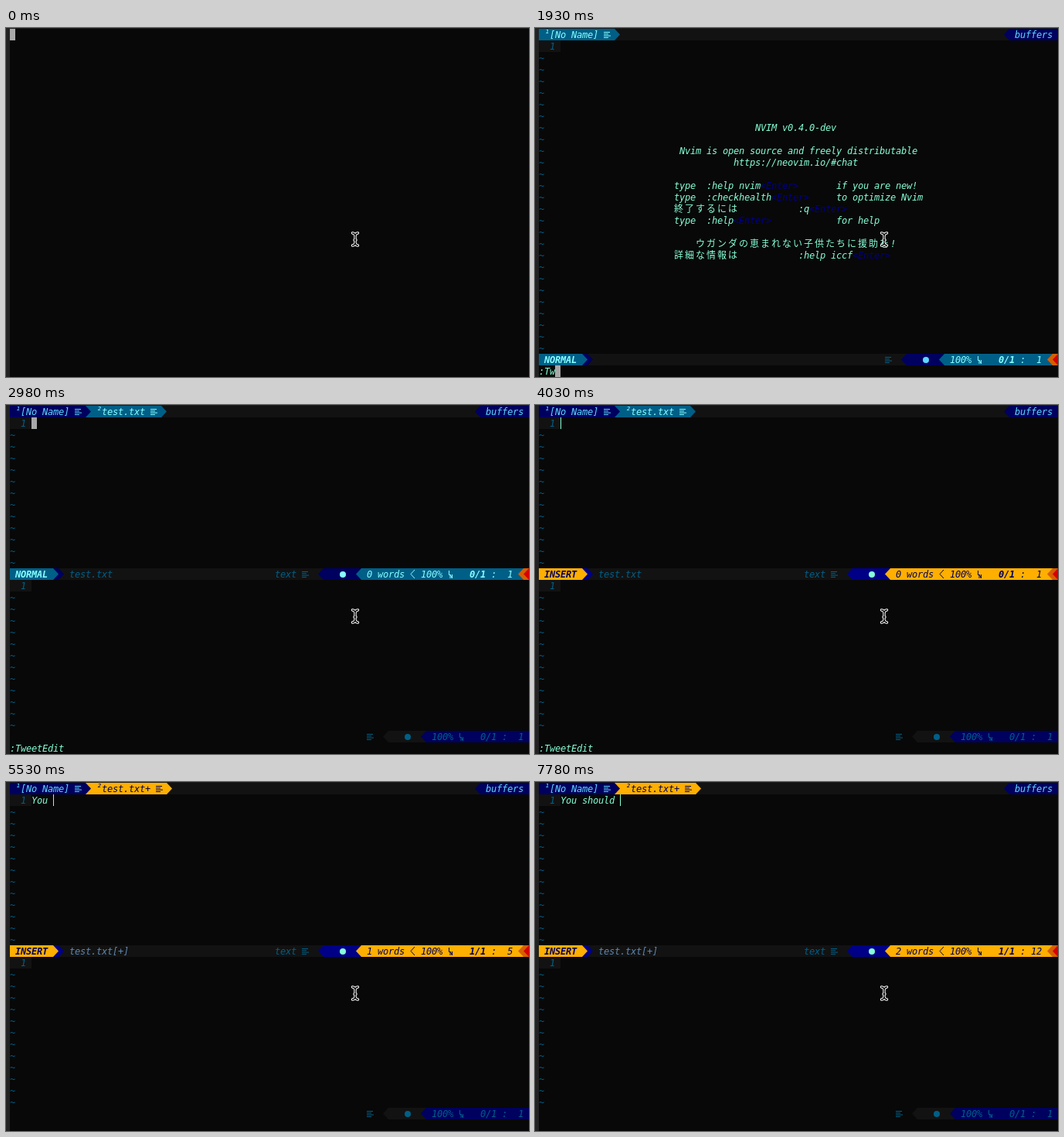
An HTML page with a canvas for the animation above (8 s loop, 677 by 451 pixels).

```html
<!DOCTYPE html>
<html lang="ja">
<head>
<meta charset="utf-8">
<title>Terminal editor</title>
<style>
html, body { margin: 0; width: 677px; height: 451px; overflow: hidden; background: #080808; }
canvas { display: block; }
</style>
</head>
<body>
<canvas id="stage" width="677" height="451"></canvas>
<script>
const ctx = document.getElementById('stage').getContext('2d');
const LOOP = 8000, CW = 7, RH = 15, COLS = 96;
const BG = '#080808', BAR = '#121212', NAVY = '#00005f', TEAL = '#005f87', AMBER = '#ffaf00',
  MINT = '#87ffd7', CYAN = '#87ffff', SKY = '#5fd7ff', GREY = '#a8a8a8';
const MONO = '12px "DejaVu Sans Mono", monospace';
const CJK = '12px "Noto Sans CJK JP", "Noto Sans CJK", sans-serif';

// Each step overrides part of the screen state from its time on.
const steps = [
  [0, { blank: true, split: false, insert: false, compl: false, line: '', words: 0,
        cmd: '', pending: '', menu: -1, popup: '', cursor: [0, 0] }],
  [150, { blank: false, cursor: [4, 1] }],
  [1190, { pending: ':' }],
  [1340, { pending: '', cmd: ':', cursor: [1, 29] }],
  [1780, { cmd: ':T', cursor: [2, 29] }],
  [1930, { cmd: ':Tw', cursor: [3, 29] }],
  [2080, { cmd: ':Tweet', menu: 0, cursor: [6, 29] }],
  [2380, { cmd: ':TweetEdit', menu: 1, cursor: [10, 29] }],
  [2830, { menu: -1, cursor: null }],
  [2980, { split: true, cursor: [4, 1] }],
  [3730, { pending: ':', cursor: null }],
  [4030, { pending: '', insert: true }],
  [4630, { line: 'Y', words: 1 }],
  [4780, { line: 'Yo' }],
  [5080, { line: 'You', compl: true, popup: 'You', cmd: '唯一の該当' }],
  [5530, { line: 'You ', compl: false, popup: '', cmd: '' }],
  [5980, { line: 'You s', words: 2 }],
  [6130, { line: 'You sh' }],
  [6280, { compl: true, popup: 'sh', cmd: '唯一の該当' }],
  [6580, { line: 'You sho', compl: false, popup: '' }],
  [6730, { line: 'You shou', cmd: '' }],
  [7480, { line: 'You shoul' }],
  [7630, { line: 'You should' }],
  [7780, { line: 'You should ' }]
];

const X = col => 5 + col * CW;
const Y = row => 1 + row * RH;

function fill(col, row, n, color, rows = 1) {
  ctx.fillStyle = color;
  ctx.fillRect(X(col), Y(row), n * CW, rows * RH);
}

// Text on the cell grid; wide characters take two cells.
function put(text, col, row, color, bold = false, dy = 0) {
  ctx.fillStyle = color;
  for (const ch of text) {
    const wide = ch.charCodeAt(0) > 0x2e80;
    ctx.font = wide ? CJK : 'italic ' + (bold ? 'bold ' : '') + MONO;
    ctx.fillText(ch, X(col), Y(row) + 12 + dy);
    col += wide ? 2 : 1;
  }
  return col;
}

// Triangular separator: dir 1 points right, -1 points left.
function arrow(col, row, color, under, dir) {
  fill(col, row, 1, under);
  const x = X(col) + (dir < 0 ? CW : 0), y = Y(row);
  ctx.fillStyle = color;
  ctx.beginPath();
  ctx.moveTo(x, y);
  ctx.lineTo(x + dir * CW, y + RH / 2);
  ctx.lineTo(x, y + RH);
  ctx.fill();
}

function stroke(points, color, width = 1) {
  ctx.strokeStyle = color;
  ctx.lineWidth = width;
  ctx.beginPath();
  points.forEach(([x, y], i) => i ? ctx.lineTo(x, y) : ctx.moveTo(x, y));
  ctx.stroke();
}

function linesIcon(col, row, color) {
  ctx.fillStyle = color;
  [8, 6, 9, 6].forEach((w, i) => ctx.fillRect(X(col), Y(row) + 4 + i * 2.3, w, 1));
}

function lineMark(col, row, color) {
  const x = X(col) + 1.5, y = Y(row);
  stroke([[x, y + 3], [x, y + 8.5], [x + 2, y + 8.5]], color);
  stroke([[x + 1.5, y + 13], [x + 1.5, y + 8], [x + 4, y + 13], [x + 4, y + 8]], color);
}

function dot(col, row, color) {
  ctx.fillStyle = color;
  ctx.beginPath();
  ctx.arc(X(col) + 4, Y(row) + 8, 4, 0, Math.PI * 2);
  ctx.fill();
}

function tabline(s) {
  const changed = s.line !== '';
  const accent = changed ? AMBER : TEAL, ink = changed ? NAVY : CYAN;
  const first = s.split ? NAVY : TEAL, firstInk = s.split ? SKY : CYAN;
  fill(0, 0, COLS, BAR);
  fill(0, 0, 14, first);
  put('¹', 1, 0, firstInk, false, -2);
  put('[No Name]', 2, 0, firstInk);
  linesIcon(12, 0, firstInk);
  arrow(14, 0, first, s.split ? accent : BAR, 1);
  if (s.split) {
    const name = changed ? 'test.txt+' : 'test.txt', end = 17 + name.length;
    fill(15, 0, end - 12, accent);
    put('²', 16, 0, ink, false, -2);
    put(name, 17, 0, ink);
    linesIcon(end + 1, 0, ink);
    arrow(end + 3, 0, accent, BAR, 1);
  }
  arrow(86, 0, NAVY, BAR, -1);
  fill(87, 0, 9, NAVY);
  put('buffers', 88, 0, SKY);
}

function statusLine(s, row) {
  const accent = s.insert ? AMBER : TEAL, ink = s.insert ? NAVY : CYAN;
  const mid = s.insert ? '#000087' : NAVY;
  const mode = s.compl ? 'INSERT COMPL' : s.insert ? 'INSERT' : 'NORMAL';
  const end = mode.length + 2, right = s.split ? 64 : 74;
  fill(0, row, COLS, BAR);
  fill(0, row, end, accent);
  put(mode, 1, row, ink, true);
  arrow(end, row, accent, mid, 1);
  arrow(end + 1, row, mid, BAR, 1);
  if (s.split) {
    put(s.line ? 'test.txt[+]' : 'test.txt', end + 3, row, s.line ? '#5f87af' : TEAL);
    put('text', 49, row, TEAL);
  }
  linesIcon(right - 10, row, TEAL);
  arrow(right - 7, row, mid, BAR, -1);
  fill(right - 6, row, 6, mid);
  dot(right - 3, row, s.insert ? MINT : s.split ? CYAN : SKY);
  arrow(right, row, accent, mid, -1);
  fill(right + 1, row, 94 - right - 1, accent);
  if (s.split) {
    put(s.words + ' words', 66, row, ink);
    const x = X(74), y = Y(row);
    stroke([[x + 6, y + 2], [x + 1, y + 7.5], [x + 6, y + 13]], ink);
  }
  put('100%', 76, row, ink);
  lineMark(81, row, ink);
  put(s.line ? '1/1' : '0/1', 85, row, ink, true);
  put(':', 89, row, ink);
  put(String(s.line.length + 1).padStart(3), 90, row, ink);
  arrow(94, row, '#d75f00', accent, -1);
  arrow(95, row, '#d70000', '#d75f00', -1);
}

function idleStatus(row) {
  linesIcon(66, row, TEAL);
  arrow(69, row, BAR, BG, -1);
  fill(70, row, 6, BAR);
  dot(73, row, TEAL);
  arrow(76, row, NAVY, BAR, -1);
  fill(77, row, 19, NAVY);
  put('100%', 78, row, TEAL);
  lineMark(83, row, TEAL);
  put('0/1 :  1', 87, row, TEAL);
}

function pane(top, bottom) {
  fill(0, top, 4, BAR);
  put('1', 2, top, TEAL);
  for (let r = top + 1; r < bottom; r++) put('~', 0, r, TEAL);
}

function intro() {
  const enter = (text, col, row) => put('<Enter>', put(text, col, row, MINT), row, '#000087');
  put('NVIM v0.4.0-dev', 40, 8, MINT);
  put('Nvim is open source and freely distributable', 26, 10, MINT);
  put('https://neovim.io/#chat', 36, 11, MINT);
  put('type', 25, 13, MINT);
  enter(':help nvim', 31, 13);
  put('if you are new!', 55, 13, MINT);
  put('type', 25, 14, MINT);
  enter(':checkhealth', 31, 14);
  put('to optimize Nvim', 55, 14, MINT);
  put('終了するには', 25, 15, MINT);
  enter(':q', 48, 15);
  put('type', 25, 16, MINT);
  enter(':help', 31, 16);
  put('for help', 55, 16, MINT);
  put('ウガンダの恵まれない子供たちに援助を!', 29, 18, MINT);
  put('詳細な情報は', 25, 19, MINT);
  enter(':help iccf', 48, 19);
}

function menus(s) {
  if (s.menu >= 0) {
    ['Tweet', 'TweetEdit', 'TweetLook'].forEach((item, i) => {
      fill(0, 26 + i, 16, i === s.menu ? TEAL : NAVY);
      put(item, 1, 26 + i, i === s.menu ? '#afffff' : MINT);
    });
  }
  if (s.popup) {
    const col = 4 + s.line.length - s.popup.length;
    fill(col - 1, 2, 16, NAVY);
    put(s.popup + ' [A]', col, 2, MINT);
  }
}

function pointer() {
  const x = 452, y = 273;
  ctx.lineCap = ctx.lineJoin = 'round';
  for (const [color, w] of [['#fff', 3.4], ['#000', 1.3]]) {
    for (const d of [-1, 1]) {
      stroke([[x - 3.5, y + d * 8], [x - 1.5, y + d * 7.5], [x, y + d * 5.5],
        [x + 1.5, y + d * 7.5], [x + 3.5, y + d * 8]], color, w);
    }
    stroke([[x, y - 5.5], [x, y + 5.5]], color, w);
    stroke([[x - 1, y + 1], [x + 1, y + 1]], color, w);
  }
  ctx.lineCap = 'butt';
  ctx.lineJoin = 'miter';
}

function draw(s) {
  ctx.fillStyle = BG;
  ctx.fillRect(0, 0, 677, 451);
  ctx.fillStyle = '#1c1c1c';
  ctx.fillRect(0, 0, 677, 1);
  ctx.fillStyle = '#222';
  ctx.fillRect(0, 0, 5, 451);
  if (!s.blank) {
    tabline(s);
    pane(1, s.split ? 14 : 28);
    if (s.split) {
      pane(15, 28);
      idleStatus(28);
      put(s.line, 4, 1, MINT);
    } else {
      intro();
    }
    statusLine(s, s.split ? 14 : 28);
    menus(s);
    put(s.cmd, 0, 29, MINT);
    put(s.pending, 85, 29, MINT);
  }
  if (s.cursor) {
    fill(s.cursor[0], s.cursor[1], 1, GREY);
  } else if (s.split) {
    ctx.fillStyle = MINT;
    ctx.fillRect(X(4 + s.line.length), Y(1), 1, RH);
  }
  pointer();
}

const start = performance.now();
function tick() {
  const t = (performance.now() - start) % LOOP;
  const state = {};
  for (const [at, change] of steps) if (at <= t) Object.assign(state, change);
  draw(state);
  requestAnimationFrame(tick);
}
tick();
</script>
</body>
</html>
```
